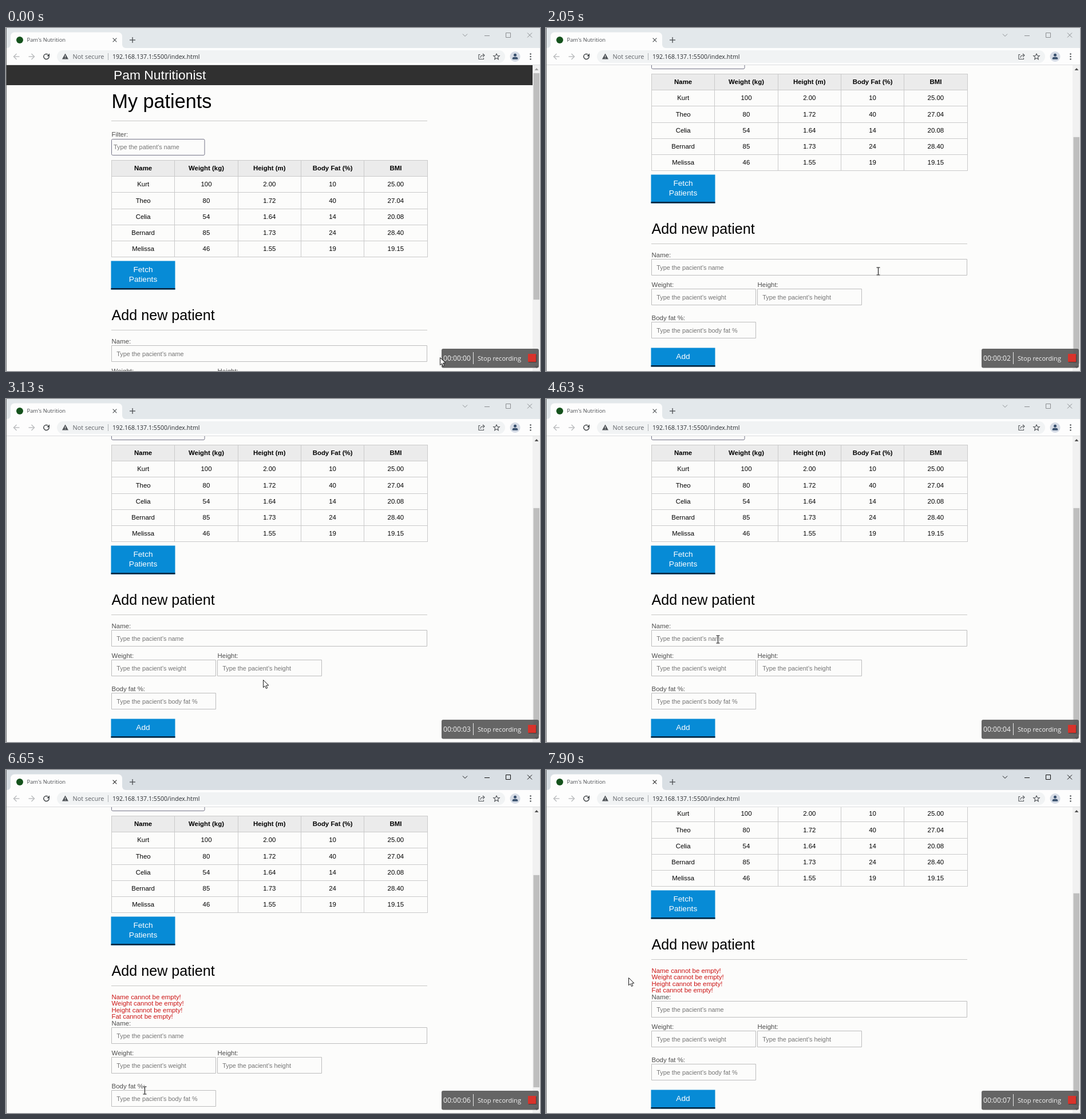
Animation of 933x600 px, one loop 8 s. Source, as an HTML page with a canvas:

```html
<!DOCTYPE html>
<html lang="en">
<head>
<meta charset="utf-8">
<title>Patients</title>
<style>
html, body { margin: 0; width: 100%; height: 100%; overflow: hidden; background: #fcfcfb; }
canvas { display: block; }
</style>
</head>
<body>
<canvas id="stage" width="933" height="600"></canvas>
<script>
const ctx = document.getElementById('stage').getContext('2d');
const LOOP = 8000, VIEW_TOP = 65, VIEW_H = 535, LEFT = 184, WIDTH = 552;
const SCROLL_MAX = 151, ERRORS_H = 46;
const FOCUS_AT = 4950, ERRORS_AT = 6050;
const SANS = '"Liberation Sans", Arial, sans-serif';
const UI = '"Open Sans", "Noto Sans", sans-serif';

const HEADS = ['Name', 'Weight (kg)', 'Height (m)', 'Body Fat (%)', 'BMI'];
const PATIENTS = [['Kurt', 100, 2, 10], ['Theo', 80, 1.72, 40], ['Celia', 54, 1.64, 14],
  ['Bernard', 85, 1.73, 24], ['Melissa', 46, 1.55, 19]];

const box = (x, y, w, h, more) => ({ x, y, w, h, ...more });
const FILTER = box(LEFT, 194, 163.5, 29);
const FETCH = box(LEFT, 408, 111, 49, { lines: ['Fetch', 'Patients'] });
const ADD = box(LEFT, 711, 111, 32, { lines: ['Add'] });
const input = (x, y, w, label, hint) => box(x, y, w, 29, { label, hint });
const NAME = input(LEFT, 555, WIDTH, 'Name:', 'name');
const FIELDS = [NAME, input(LEFT, 607, 183, 'Weight:', 'weight'),
  input(LEFT + 185, 607, 183, 'Height:', 'height'),
  input(LEFT, 665, 183, 'Body fat %:', 'body fat %')];

// Pointer stops: x, y, arrival and, where it rests, departure
const STOPS = [[758, 576, 0, 250], [545, 232, 800], [580, 425, 1600, 2530], [493, 454, 2830],
  [449, 491, 3130], [287, 581, 3630, 3750], [214, 578, 4100], [300, 420, 4600, 4980],
  [244, 580, 5500, 6500], [238, 508, 7050], [351, 464, 7350], [144, 363, 7900, LOOP]];

const clamp01 = u => Math.max(0, Math.min(1, u));
const glide = (t, start) => 1 - (1 - clamp01((t - start) / 300)) ** 2;

function scrollAt(t) {
  return SCROLL_MAX * (glide(t, 1180) - glide(t, 2130) + glide(t, 2830))
    + ERRORS_H * glide(t, 6810);
}

function pointerAt(t) {
  const i = STOPS.findLastIndex(s => s[2] <= t);
  const [x, y, arrive, leave = arrive] = STOPS[i];
  const [nx, ny, next] = STOPS[i + 1] || [x, y, LOOP + 1];
  const u = clamp01((t - leave) / (next - leave));
  return [x + (nx - x) * u, y + (ny - y) * u];
}

function rect(x, y, w, h, color) {
  ctx.fillStyle = color;
  ctx.fillRect(x, y, w, h);
}

function round(x, y, w, h, r, color) {
  ctx.beginPath();
  ctx.roundRect(x, y, w, h, r);
  ctx.fillStyle = color;
  ctx.fill();
}

function frame({ x, y, w, h }, color, r = 0, width = 1) {
  ctx.beginPath();
  ctx.roundRect(x + width / 2, y + width / 2, w - width, h - width, r);
  ctx.strokeStyle = color;
  ctx.lineWidth = width;
  ctx.stroke();
}

function circle(x, y, r, color) {
  round(x - r, y - r, 2 * r, 2 * r, r, color);
}

function line(color, width, ...pts) {
  ctx.beginPath();
  pts.forEach(p => ctx.lineTo(...p));
  ctx.strokeStyle = color;
  ctx.lineWidth = width;
  ctx.stroke();
}

function poly(color, ...pts) {
  ctx.beginPath();
  pts.forEach(p => ctx.lineTo(...p));
  ctx.closePath();
  ctx.fillStyle = color;
  ctx.fill();
}

function triangle(x, y, w, h, color) {
  poly(color, [x - w / 2, y + h / 2], [x + w / 2, y + h / 2], [x, y - h / 2]);
}

function cross(x, y, r, color, width) {
  line(color, width, [x - r, y - r], [x + r, y + r]);
  line(color, width, [x + r, y - r], [x - r, y + r]);
}

function text(str, x, y, size, color, { align = 'left', bold = false, font = SANS } = {}) {
  ctx.font = `${bold ? 'bold ' : ''}${size}px ${font}`;
  ctx.textAlign = align;
  ctx.fillStyle = color;
  ctx.fillText(str, x, Math.round(y));
}

const label = (s, x, y) => text(s, x + 0.6, y, 11.43, '#4c4c4c');
const hint = (s, x, y) => text(s, x, y, 10.85, '#757575');
const rule = y => rect(LEFT, y, WIDTH, 1, '#c8c8c6');

function field(f) {
  label(f.label, f.x, f.y - 3.5);
  frame(f, '#bdbdbd');
  hint("Type the pacient's " + f.hint, f.x + 9.3, f.y + 18.5);
}

function button({ x, y, w, h, lines }) {
  rect(x - 0.5, y - 0.5, w + 1, h + 1, '#078bd6');
  rect(x - 0.5, y + h - 2, w + 1, 2.5, '#06223a');
  lines.forEach((s, i) => text(s, x + w / 2, y + 19.4 + i * 16.3, 13.7, '#fff', { align: 'center' }));
}

function table() {
  const top = 231, rowH = 28.2, colW = 110.3;
  const rows = PATIENTS.map(([name, kg, m, fat]) =>
    [name, kg, m.toFixed(2), fat, (kg / m ** 2).toFixed(2)]);
  rect(LEFT, top, WIDTH, 28, '#ebebeb');
  [HEADS, ...rows].forEach((row, i) => row.forEach((s, j) =>
    text(s, LEFT + 0.5 + colW * (j + 0.5), top + rowH * (i + 0.5) + 4, 11.43, '#000',
      { align: 'center', bold: i === 0 })));
  for (let i = 0; i <= 6; i++) rect(LEFT, Math.round(top + rowH * i), WIDTH, 1, '#cacaca');
  for (let j = 0; j <= 5; j++) rect(Math.round(LEFT + colW * j), top, 1, 170, '#cacaca');
}

function form(t, shift) {
  if (shift) ['Name', 'Weight', 'Height', 'Fat'].forEach((s, i) =>
    text(s + ' cannot be empty!', LEFT + 0.5, 552 + i * 11.43, 11.43, '#cc1414'));
  ctx.save();
  ctx.translate(0, shift);
  FIELDS.forEach(field);
  if (t >= FOCUS_AT && !shift) {
    frame(box(NAME.x - 0.5, NAME.y - 0.5, NAME.w + 1, NAME.h + 1), '#101010', 2, 2.2);
    if ((t - FOCUS_AT) % 1000 < 500) rect(NAME.x + 9, NAME.y + 9, 1, 13, '#000');
  }
  button(ADD);
  ctx.restore();
}

function page(t, scroll, shift) {
  ctx.save();
  ctx.beginPath();
  ctx.rect(0, VIEW_TOP, 920, VIEW_H);
  ctx.clip();
  rect(0, VIEW_TOP, 920, VIEW_H, '#fcfcfb');
  ctx.translate(0, -scroll);
  rect(0, VIEW_TOP, 920, 35, '#303030');
  text('Pam Nutritionist', 188, 90, 22.87, '#fff');
  text('My patients', LEFT + 0.5, 140, 34.2, '#000');
  rule(162);
  label('Filter:', LEFT, 190);
  frame(FILTER, '#747488', 2);
  hint("Type the patient's name", 188, 212);
  table();
  button(FETCH);
  text('Add new patient', LEFT + 0.5, 511, 25.15, '#000');
  rule(528);
  form(t, shift);
  ctx.restore();
}

function scrollbar(scroll, shift) {
  const ratio = 508 / (VIEW_H + SCROLL_MAX + shift);
  rect(920, VIEW_TOP, 13, VIEW_H, '#f1f1f1');
  rect(921.5, 79 + scroll * ratio, 10.5, VIEW_H * ratio, '#bebebe');
  triangle(927, 72, 7, 4, scroll < 1 ? '#a3a3a3' : '#505050');
  triangle(927, 593, 7, -4, '#505050');
}

function star(x, y, color) {
  const pts = Array.from({ length: 11 }, (_, i) => {
    const a = i * Math.PI / 5, r = i % 2 ? 2.5 : 5.6;
    return [x + r * Math.sin(a), y - r * Math.cos(a)];
  });
  line(color, 1.1, ...pts);
}

function titleBar(active) {
  const back = active ? '#d9dfe4' : '#e3e8eb';
  const ink = active ? '#111' : '#8b8e91';
  rect(0, 0, 933, 35, back);
  rect(2, 29, 207, 6, '#fdfdfd');
  round(-4, 21, 12, 14, [0, 0, 6, 0], back);
  round(203, 21, 12, 14, [0, 0, 0, 6], back);
  round(8, 7.5, 195, 28, [7, 7, 0, 0], '#fdfdfd');
  circle(24, 21, 6, '#14521c');
  text("Pam's Nutrition", 36.5, 24, 9.4, '#4a4d51', { font: UI });
  cross(190, 21, 3.3, active ? '#333' : '#55585b', 1.2);
  rect(216, 20.4, 10, 1.3, '#4a4d51');
  rect(220.4, 16, 1.3, 10, '#4a4d51');
  line(ink, 1, [798, 10.5], [802, 14.5], [806, 10.5]);
  rect(836, 13, 9, 1, ink);
  frame(box(873, 8, 9, 9), ink);
  cross(915, 12.5, 4, ink, 1);
}

function navArrow(x, dir) {
  line('#b9bbbd', 1.4, [x - 5 * dir, 50], [x + 5 * dir, 50]);
  line('#b9bbbd', 1.4, [x, 45], [x + 5 * dir, 50], [x, 55]);
}

function toolbar() {
  const ink = '#505458';
  rect(0, 35, 933, 30, '#fdfdfd');
  rect(0, 64, 933, 1, '#dcdedf');
  navArrow(18.5, -1);
  navArrow(44.5, 1);
  ctx.beginPath();
  ctx.arc(70.5, 50, 4.6, -0.3, -1);
  ctx.strokeStyle = '#3c4043';
  ctx.lineWidth = 1.5;
  ctx.stroke();
  poly('#3c4043', [76, 44.5], [76, 49.3], [71.2, 49.3]);
  round(89, 39, 783, 22, 11, '#f1f3f4');
  triangle(103.5, 49.5, 11, 10, ink);
  rect(103, 48, 1, 3, '#fff');
  rect(103, 52, 1, 1, '#fff');
  text('Not secure', 116.5, 54, 10.9, '#5f6368', { font: UI });
  rect(178, 44, 1, 12, '#aeb2b6');
  text('192.168.137.1:5500/index.html', 186, 54, 10.6, '#2b2e32', { font: UI });
  line(ink, 1.1, [828.5, 46.5], [826, 46.5], [826, 54.5], [834.5, 54.5], [834.5, 52.5]);
  line(ink, 1.1, [829, 52], [830, 48.8], [832.5, 47.8], [835.5, 47.8]);
  line(ink, 1.1, [833, 44.8], [836, 47.8], [833, 50.8]);
  star(857, 50.3, ink);
  circle(889.5, 50, 9, '#d6dce6');
  circle(889.5, 47.3, 2.5, '#39506e');
  round(884.7, 50.8, 9.6, 4, [4, 4, 1, 1], '#39506e');
  for (let i = -1; i <= 1; i++) circle(916.5, 50 + 4.5 * i, 1.3, ink);
}

function recorder(t) {
  const say = (s, x, size) => text(s, x, 582, size, '#f4f4f4', { font: UI });
  round(761, 561, 170, 33.5, 3, 'rgba(88,88,88,.92)');
  say('00:00:0' + Math.floor(t / 1000), 764, 12.1);
  rect(816, 567, 1, 21, '#e8e8e8');
  say('Stop recording', 824, 11.15);
  rect(913, 571, 14, 14, '#4a3a3a');
  rect(912, 570, 14, 14, '#d8332b');
}

function arrow() {
  const pts = [[0, 0], [0, 13.2], [3, 10.4], [5, 15], [7.2, 14], [5.2, 9.6], [9.4, 9.4]];
  poly('#fff', ...pts);
  line('#1a1a1a', 1, ...pts, pts[0]);
}

function beam() {
  for (const [color, width] of [['#fff', 2], ['#111', 1.1]]) {
    line(color, width, [0, -6], [0, 6]);
    for (const y of [-6.5, 6.5]) line(color, width, [-3, y], [3, y]);
  }
}

function hand() {
  for (const [color, inset] of [['#111', 0], ['#fff', 1]]) {
    const part = (x, y, w, h, r) =>
      round(x + inset, y + inset, w - 2 * inset, h - 2 * inset, r, color);
    part(-2, -0.5, 4.2, 14, 2);
    part(-4.5, 7.5, 7, 6, 3);
    part(-2, 5.5, 9.5, 12, 3);
  }
}

// The pointer's shape follows what lies under it.
function pointer(x, y, scroll, shift) {
  const over = (b, dy = 0) => x > b.x && x < b.x + b.w &&
    y + scroll > b.y + dy && y + scroll < b.y + dy + b.h;
  const overLabel = f => over(box(f.x, f.y - 14, 59, 13), shift);
  let shape = arrow;
  if (over(FETCH) || over(ADD, shift)) shape = hand;
  else if (over(FILTER) || FIELDS.some(f => over(f, shift) || overLabel(f))) shape = beam;
  ctx.save();
  ctx.translate(Math.round(x) + 0.5, Math.round(y) + 0.5);
  shape();
  ctx.restore();
}

function draw(t) {
  const scroll = Math.round(scrollAt(t));
  const shift = t >= ERRORS_AT ? ERRORS_H : 0;
  page(t, scroll, shift);
  scrollbar(scroll, shift);
  titleBar(t >= FOCUS_AT);
  toolbar();
  rect(0, 0, 1, 600, '#6a6c6e');
  recorder(t);
  pointer(...pointerAt(t), scroll, shift);
}

const start = performance.now();
function tick() {
  draw((performance.now() - start) % LOOP);
  requestAnimationFrame(tick);
}
tick();
</script>
</body>
</html>
```
